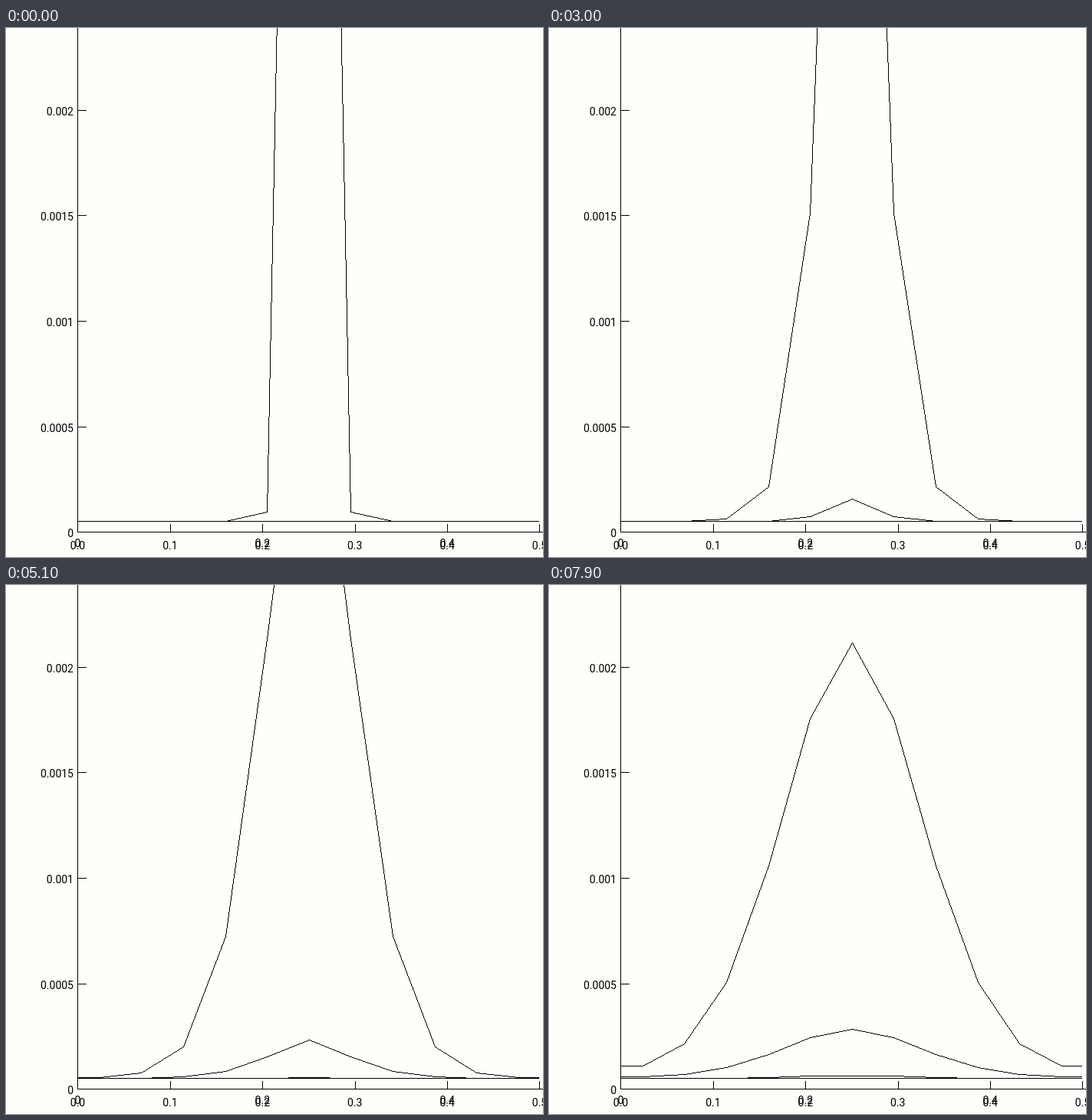
Animation of 700x690 px, one loop 8000 ms. Source, as an HTML page with a canvas:

```html
<!DOCTYPE html>
<html lang="en">
<head>
<meta charset="utf-8">
<title>Diffusion on a line</title>
<style>
  html, body { margin: 0; width: 100%; height: 100%; overflow: hidden; background: #fefffa; }
  canvas, svg { position: absolute; left: 0; top: 0; width: 700px; height: 690px; }
  text { font: 14px Roboto, "Liberation Sans", sans-serif; fill: #000; }
</style>
</head>
<body>
<canvas id="plot" width="700" height="690"></canvas>
<svg id="labels" viewBox="0 0 700 690"></svg>
<script>
const LOOP = 8000, LEFT = 93, RIGHT = 695, AXIS = 657, BASE = 643;
const ctx = document.getElementById('plot').getContext('2d');
const labels = document.getElementById('labels');

// Moments at which the picture is redrawn, in tenths of a second.
const STEPS = [0,
  4, 5, 7, 8, 9, 10, 12, 13,
  15, 17, 18, 20, 22, 24, 25,
  26, 27, 29, 30, 32, 33, 35, 36,
  38, 40, 41, 43, 45, 46, 48,
  51, 53, 55, 56, 58, 60, 61,
  63, 65, 67, 68, 69, 71, 73,
  74, 76, 77, 79];

// Square root of the diffusion time against the clock.
const SPREAD = [[3, .0933], [8, .1817], [22, .4935], [38, .853], [51, 1.183], [68, 1.5346], [79, 1.797]];

function spreadAt(t) {
  if (t <= SPREAD[0][0]) return SPREAD[0][1];
  const i = SPREAD.findIndex(p => p[0] >= t);
  const [t0, w0] = SPREAD[i - 1], [t1, w1] = SPREAD[i];
  return w0 + (w1 - w0) * (t - t0) / (t1 - t0);
}

// Modified Bessel function: the spread of a point source on a grid.
function bessel(order, z) {
  let term = 1, sum = 0;
  for (let i = 1; i <= order; i++) term *= z / 2 / i;
  for (let m = 1; m < 16; m++) {
    sum += term;
    term *= z * z / 4 / (m * (m + order));
  }
  return sum;
}

function line(x0, y0, x1, y1) {
  const dx = x1 - x0, dy = y1 - y0;
  if (!dx || !dy) {
    ctx.fillRect(Math.min(x0, x1), Math.min(y0, y1), Math.abs(dx) + 1, Math.abs(dy) + 1);
    return;
  }
  const n = Math.max(Math.abs(dx), Math.abs(dy));
  for (let i = 0; i <= n; i++) {
    const y = Math.round(y0 + dy * i / n);
    if (y >= 0) ctx.fillRect(Math.round(x0 + dx * i / n), y, 1, 1);
  }
}

function curve(amount, profile) {
  const heights = profile.map(p => Math.floor(amount * p + .1));
  let x = LEFT, y = BASE - heights[5];
  for (let k = -5; k <= 5; k++) {
    const nx = Math.round(394.8 + 54.6 * k), ny = BASE - heights[Math.abs(k)];
    line(x, y, nx, ny);
    [x, y] = [nx, ny];
  }
  line(x, y, RIGHT - 1, y);
}

function axes() {
  line(LEFT, 0, LEFT, AXIS);
  line(LEFT, AXIS, 699, AXIS);
  for (const y of [107, 244, 382, 520]) line(LEFT, y, LEFT + 11, y);
  for (const x of [214, 334, 455, 575, 695]) line(x, AXIS - 10, x, AXIS);
}

function draw(t) {
  const z = spreadAt(t) ** 2;
  const profile = [0, 1, 2, 3, 4, 5].map(k => Math.exp(-z) * (bessel(k, z) + bessel(11 - k, z)));
  ctx.fillStyle = '#fefffa';
  ctx.fillRect(0, 0, 700, 690);
  ctx.fillStyle = '#000';
  axes();
  curve(2773 * Math.exp(-.04 * z), profile);
  curve(100 * z * Math.exp(-.048 * z), profile);
  curve(1.48 * z * z, profile);
  curve(0, profile);
}

function label(text, x, y, anchor) {
  const el = document.createElementNS('http://www.w3.org/2000/svg', 'text');
  el.setAttribute('x', x);
  el.setAttribute('y', y);
  el.setAttribute('text-anchor', anchor);
  el.textContent = text;
  labels.append(el);
}

[['0.002', 107], ['0.0015', 244], ['0.001', 382], ['0.0005', 520], ['0', AXIS]]
  .forEach(([text, y]) => label(text, 88, y + 7, 'end'));
for (let i = 0; i <= 5; i++) label((i / 10).toFixed(1), 93.5 + 120.4 * i, 680, 'middle');
['0', '0.2', '0.4'].forEach((text, i) => label(text, 93.5 + 240.8 * i, 677, 'middle'));

let shown = -1;
const start = performance.now();
function tick() {
  const t = ((performance.now() - start) % LOOP) / 100;
  const step = STEPS.filter(s => s <= t).pop();
  if (step !== shown) draw(shown = step);
  requestAnimationFrame(tick);
}
tick();
</script>
</body>
</html>
```
